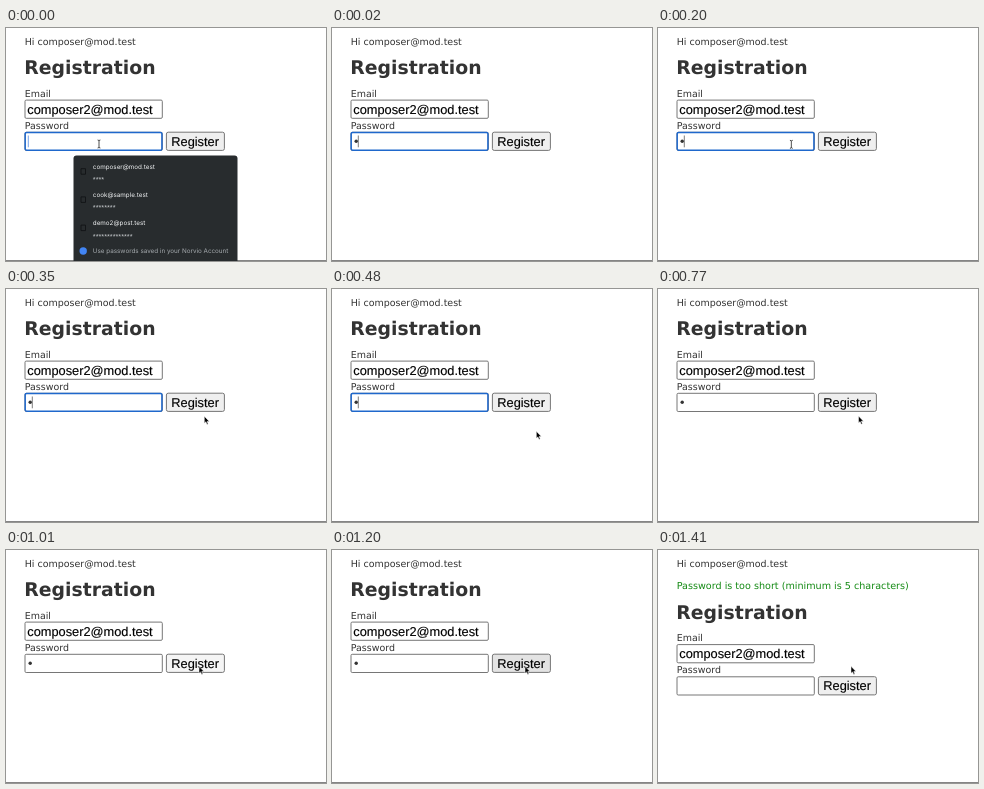
An HTML page that plays this animation: 320 px wide and 233 px high, repeating every 2.18 s.

```html
<!DOCTYPE html>
<html lang="en">
<head>
<meta charset="utf-8">
<title>Registration</title>
<style>
  html, body { margin: 0; width: 100%; height: 100%; overflow: hidden; background: #fff; }
  svg { display: block; width: 100%; height: 100%; }
  text { white-space: pre; text-rendering: geometricPrecision; }
  .page { font: 9.47px Verdana, "DejaVu Sans", sans-serif; fill: #333; }
  .page .title { font-size: 18.85px; font-weight: bold; }
  .page .notice { font-size: 9.62px; fill: #148a14; }
  .page .control { font: 12.8px Arial, "Liberation Sans", sans-serif; fill: #000; stroke: #000; stroke-width: .15; }
  .box { fill: #fff; stroke: #767676; }
  .popup { font: 6.3px Inter, sans-serif; fill: #f1f3f4; }
  .popup .stars { font: 7.3px "Liberation Sans", Arial, sans-serif; fill: #c8cbce; }
  .popup .hint { fill: #a6abaf; }
</style>
</head>
<body>
<svg viewBox="0 0 320 233">
  <rect width="320" height="233" fill="#fff"/>
  <path d="M0 232.5H320" stroke="#858585"/>
  <g class="page">
    <text x="18.7" y="17">Hi composer@mod.test</text>
    <text id="notice" class="notice" x="18.7" y="39.4">Password is too short (minimum is 5 characters)</text>
    <g id="form">
      <text class="title" x="18.3" y="46">Registration</text>
      <text x="18.7" y="68.6">Email</text>
      <rect class="box" x="19" y="72.1" width="137.3" height="18.2" rx="1.2"/>
      <text class="control" x="21.3" y="85.6">composer2@mod.test</text>
      <text x="18.7" y="100.6">Password</text>
      <rect class="box" x="19" y="104.3" width="137.3" height="18.2" rx="1.2"/>
      <rect id="ring" x="19.2" y="104.4" width="136.7" height="17.8" rx="1.4" fill="#fff" stroke="#1f68cc" stroke-width="1.5"/>
      <circle id="dot" cx="24.2" cy="113.3" r="1.7"/>
      <path id="caret" d="M0 107.5V119.3" stroke-width=".7"/>
      <rect id="button" class="box" x="160.4" y="104.2" width="58" height="18.2" rx="1.8"/>
      <text class="control" x="165.3" y="117.7">Register</text>
    </g>
  </g>
  <g id="popup" class="popup">
    <path d="M67.5 233V130.5Q67.5 127.5 70.5 127.5H228.5Q231.5 127.5 231.5 130.5V233Z" fill="#282c2e"/>
    <g id="accounts"></g>
    <circle cx="77.2" cy="223" r="3.7" fill="#4285f4"/>
    <text class="hint" x="86.8" y="225.2">Use passwords saved in your Norvio Account</text>
  </g>
  <path id="beam" d="M-1.4 -4Q0 -4 0 -3V3Q0 4 -1.4 4M1.4 -4Q0 -4 0 -3M0 3Q0 4 1.4 4" fill="none" stroke="#222" stroke-width=".8"/>
  <path id="arrow" d="M0 0V7L1.6 5.6L2.7 8.2L3.9 7.7L2.8 5.2H5Z" fill="#000" stroke="#fff" stroke-width=".5"/>
</svg>
<script>
const LOOP = 2180, SUBMITTED = 1410;
const $ = id => document.getElementById(id);
const show = (id, on) => $(id).setAttribute("display", on ? "inline" : "none");
const set = (id, attrs) => { for (const k in attrs) $(id).setAttribute(k, attrs[k]); };

const accounts = [["composer@mod.test", 4], ["cook@sample.test", 8], ["demo2@post.test", 14]];
$("accounts").innerHTML = accounts.map(([mail, count], i) => {
  const y = 138.2 + i * 28.2;
  return `<path d="M75 ${y + 2.5}h4.5v5.5h-4.5z" fill="none" stroke="#111416" stroke-width=".9"/>
    <text x="86.8" y="${y + 2.4}">${mail}</text>
    <text class="stars" x="86.8" y="${y + 16}">${"*".repeat(count)}</text>`;
}).join("");

// Pointer path: time, x, y
const path = [
  [80, 93, 116], [170, 118, 116], [260, 164, 117], [320, 191, 123], [350, 198.3, 127.2],
  [410, 203, 137], [500, 205, 145], [570, 205.3, 144], [630, 205, 141],
  [770, 200.5, 127], [810, 197, 122], [870, 193, 116.3]
];
const lateTicks = [570, 630, 680, 720, 770, 810, 870];

// The pointer is redrawn in steps, not continuously
function tick(t) {
  if (t < 570) return Math.min(500, 80 + 30 * Math.floor((t - 80) / 30));
  return lateTicks.filter(k => k <= t).pop();
}

function pointerAt(t) {
  const i = path.findIndex(p => p[0] >= t);
  if (i < 1) return path[i].slice(1);
  const [t0, x0, y0] = path[i - 1], [t1, x1, y1] = path[i];
  const k = (t - t0) / (t1 - t0);
  return [x0 + (x1 - x0) * k, y0 + (y1 - y0) * k];
}

function render(t) {
  const open = t < 20, submitted = t >= SUBMITTED, focused = t < 500;
  const typing = t >= 20 && t < 80;
  const [x, y] = pointerAt(t < 80 ? 80 : tick(t));
  const inField = x < 157 && y < 123;
  const hover = !submitted && x > 160 && x < 219 && y > 104 && y < 123;
  const pressed = t >= 1010 && t < 1200;

  show("popup", open);
  show("notice", submitted);
  set("form", { transform: `translate(0 ${submitted ? 22.5 : 0})` });
  show("dot", !open && !submitted);
  show("ring", focused);
  show("caret", focused);
  set("caret", { transform: `translate(${open ? 22.3 : 26.3} 0)`, stroke: open ? "#3d7be0" : "#444" });
  set("button", { style: `fill:${pressed ? "#f5f5f5" : hover ? "#e3e3e3" : "#efefef"}` });
  show("beam", !typing && inField);
  show("arrow", !typing && !inField);
  set(inField ? "beam" : "arrow", { transform: `translate(${x} ${y})` });
}

const start = performance.now();
function frame() {
  render((performance.now() - start) % LOOP);
  requestAnimationFrame(frame);
}
frame();
</script>
</body>
</html>
```
